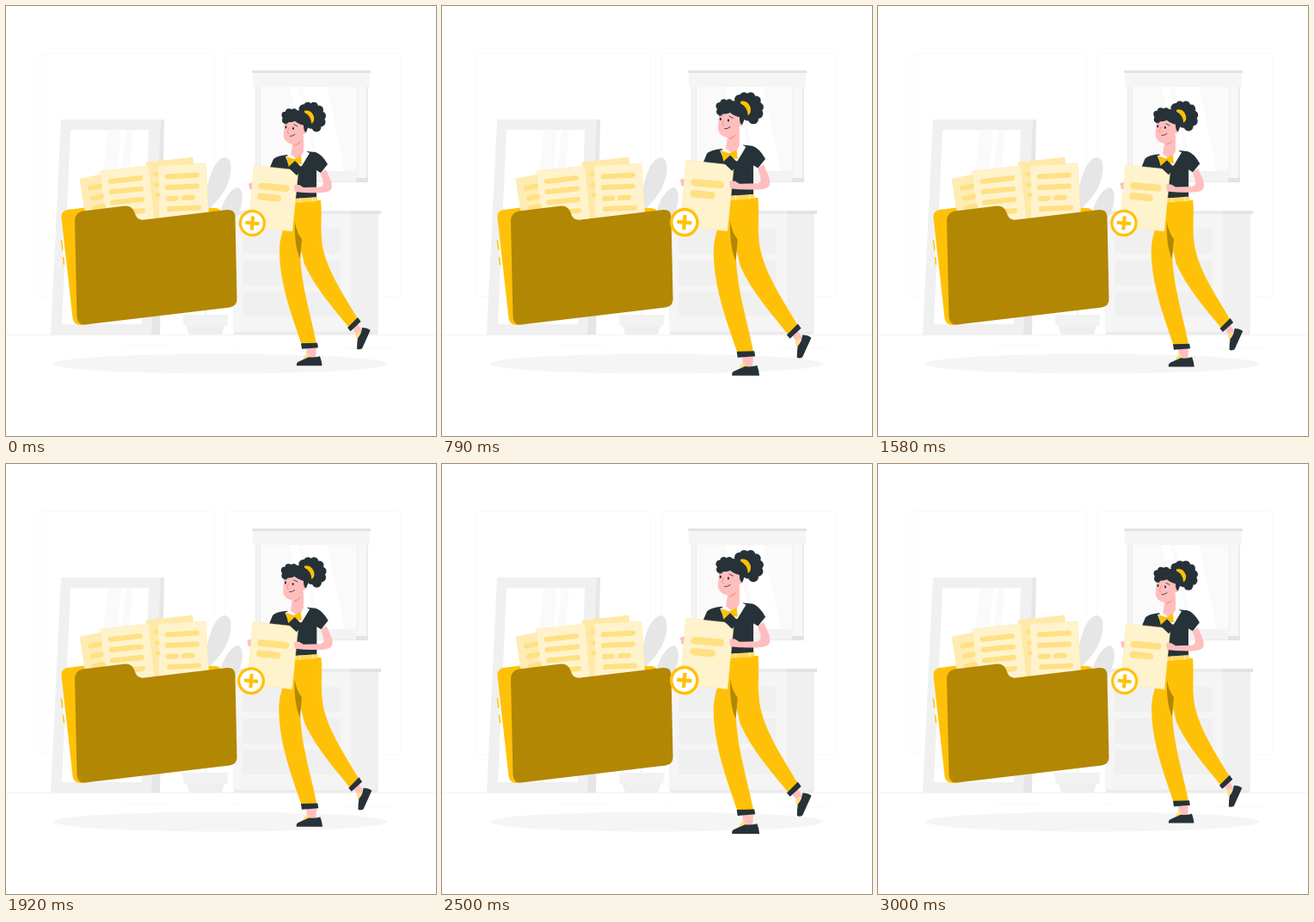
An HTML page that plays this animation: 500 by 500 pixels, repeating every 3040 ms.

```html
<!DOCTYPE html>
<html lang="en">
<head>
<meta charset="utf-8">
<title>Adding a file to a folder</title>
<style>
html, body { margin: 0; width: 100%; height: 100%; overflow: hidden; background: #fff; }
svg { display: block; width: 100vw; height: 100vh; }
.round { fill: none; stroke-linecap: round; stroke-linejoin: round; }
</style>
</head>
<body>
<svg viewBox="0 0 500 500">
  <!-- room -->
  <g fill="none" stroke="#f9f9f9">
    <rect x="39.5" y="55.5" width="203" height="282" rx="2"/>
    <rect x="255.5" y="55.5" width="203" height="282" rx="2"/>
    <path stroke="#f3f3f3" d="M0 382.500H500"/>
    <path d="M135 395.500H192M263 395.500H271M392 398.500H448"/>
  </g>

  <!-- mirror -->
  <path fill="#e6e6e6" d="M170 132H184L179 382H160Z"/>
  <path fill="#f0f0f0" d="M64 132H180L169 382H52Z"/>
  <path fill="#fff" d="M75 144H166L158 370H65Z"/>
  <path fill="#fafafa" d="M118 144H134L124 250H108ZM139 144H148L138 250H129Z"/>

  <!-- window -->
  <path fill="#ebebeb" d="M290 80H421V205H290Z"/>
  <path fill="#f3f3f3" d="M291 80H408V204H291Z"/>
  <path fill="#e3e3e3" d="M407 200H421V205H407Z"/>
  <path fill="#f7f7f7" d="M408 80H419V200H408Z"/>
  <path fill="#fafafa" d="M296 80H410V192H296Z"/>
  <path fill="#fff" d="M330 94H340L362 192H352ZM345 94H373L394 192H366Z"/>
  <path fill="none" stroke="#ebebeb" d="M295.500 94V192M408.500 94V192"/>
  <path fill="#f5f5f5" d="M287 78H423V94H287Z"/>
  <path fill="#e3e3e3" d="M286 75H424V78H286Z"/>

  <!-- cabinet -->
  <path fill="#f5f5f5" d="M264 242H402V380H264Z"/>
  <path fill="#f0f0f0" d="M401 242H433V380H401ZM275 259H389V288H275ZM275 296H389V325H275ZM275 332H389V361H275Z"/>
  <path fill="#ebebeb" d="M262 238H401V242H262ZM265 379H432V382H265Z"/>
  <path fill="#e3e3e3" d="M401 238H436V242H401Z"/>

  <!-- plant -->
  <g fill="#e6e6e6">
    <path d="M231 244C231 211 240 177 255 176C267 178 263 212 240 232L233 246Z"/>
    <path d="M243 270C246 238 258 212 270 211C279 216 275 240 262 253L250 275Z"/>
  </g>
  <path fill="none" stroke="#e6e6e6" d="M232 340V362"/>
  <path fill="#f2f2f2" d="M205 359H259L257 372H207Z"/>
  <path fill="#efefef" d="M210 372H254L251 382H213Z"/>

  <ellipse cx="249.500" cy="416" rx="194" ry="11.500" fill="#f5f5f5"/>

  <!-- folder -->
  <path fill="#ffc107" d="M64.500 246Q64 238.500 71 237L95 234L243 235Q250 235 250 241L262 340L88 371Q79 371.500 77.500 363Z"/>
  <path fill="none" stroke="#fff" stroke-width="1.500" d="M66 271L68.500 301"/>
  <path fill="none" stroke="#ffc107" stroke-width="1.500" stroke-dasharray="12 8" d="M64.500 272L67.500 301"/>
  <g stroke="#ffe69c" stroke-width=".5">
    <path fill="#ffecb4" d="M86 201L140 190L150 250L95 260Z"/>
    <path fill="#ffe9a8" d="M163 182L217 176L222 240L170 250Z"/>
    <path fill="#fff3cd" d="M110 192L166 186L173 252L115 260Z"/>
    <path fill="#fff3cd" d="M177 185.500L232 183L236 245L178 252Z"/>
  </g>
  <g class="round" stroke="#ffe083" stroke-width="6">
    <path d="M98 211.500L109 209.500M101 223.500L111 221.500M103 235L113 233"/>
    <path d="M121.500 204L156 200M122.500 216L157 212.500M124 228.500L158 225M126 241L159 238"/>
    <path stroke-width="5" d="M174 195H175M175 208H176M176 220H177"/>
    <path d="M187.500 198.500L222 196.500M188 211L222 209.500M189 224L198 223.500M207 223L217 222.500M190 236L224 234.500"/>
  </g>
  <path fill="#b28704" d="M80 250Q80 240.500 89 238.500L138 232.500Q146 231.500 149 239L151 244Q154 249.500 161 248.500L257 237Q266 236 266.500 245L268.500 340Q269 349 260 350.500L92 370.500Q83 371.500 82.500 361Z"/>

  <g id="woman">
    <!-- legs -->
    <path fill="#ffbebe" d="M400 371L407 366L414 378L408 382ZM349 396H361L360 410H350Z"/>
    <path fill="#ffe083" d="M406 382L411 377L412 383L409 389ZM347 407L351 403L353 408L345 411Z"/>
    <path fill="#263238" d="M414 374Q420 374 423.500 377L414 398Q411 400 408 398.500Q408 391 409 386Q413 382 414 374Z"/>
    <path fill="#263238" d="M338 418Q337 414 342 412.500L352 408Q358 409 365 407Q367 412 367.500 418Z"/>
    <path fill="#ffc107" d="M336 226L366 226C368 245 364.500 258 368.500 282C375 311 394 338 409 364L399 374C381 352 359 327 347 300L337 260Z"/>
    <path fill="#ffc107" d="M335 228H349L342 287C343 325 354 357 361 392L344 394C331 356 318 322 318 282C319 260 330 243 335 228Z"/>
    <path fill="#b28704" d="M336 251Q338 264 344 271L342 294Q335 279 336 251Z"/>
    <path fill="#263238" d="M409 362L412.500 367L400.500 378L397 374ZM343 392L362 391.500L363 397L344 398.500Z"/>

    <!-- trunk -->
    <path fill="#ffbebe" d="M334 156L346 151L346 174L340 186L331 174Z"/>
    <path fill="#263238" d="M327 173Q315 174 311 178L306 190L330 197L335 224L361 223L361 191L366 194L374 184Q367 172 360 170L350 169L339 184Z"/>
    <path fill="#fff" d="M331 173L325 175L331 190L344 186L353 171L347 168L341 178Z"/>
    <path fill="#ffbebe" d="M335 160L344 160L343 172L336 177L333 173Z"/>
    <path fill="#ffd95f" d="M336 224L362 222V227L335 229Z"/>
    <path class="round" stroke="#fff3cd" d="M342 224V228M357 223V227"/>

    <!-- paper -->
    <path fill="#ffbebe" d="M290 205L283 206Q281 208 283 210L283 213L291 214Z"/>
    <path fill="#fff3cd" stroke="#ffe69c" stroke-width=".5" d="M288.500 185.500L340 191L333 262L282 256Z"/>
    <path class="round" stroke="#ffe083" stroke-width="8" d="M297.500 209.500L325.500 212M296.500 221.500L316 223.500"/>
    <path fill="#ffbebe" d="M365.500 194L372 190C377 201 380 207 378.500 212C376 219 359 217 346 217L336 216L335 208L341 208L346 211L365 210.500C372 209 368 202 365.500 194Z"/>

    <!-- bow tie -->
    <path fill="#ffc107" d="M326 175L335 178L343 174L344 184L336 183L329 188Z"/>
    <path fill="#263238" d="M336 180L345 189L338 197L328 187.500Z"/>

    <!-- head -->
    <path fill="#ffbebe" d="M324 135Q336 130 346 137Q351 137 350 144Q350 149 346 149Q343 161 333 161Q321 158 323 147Z"/>
    <path fill="#ff9a8d" d="M335 161Q341 160 344 155Q342 161 336 163Z"/>
    <g fill="#263238" id="curls"></g>
    <path fill="#263238" d="M323 127Q327 121 333 122Q346 119 353 129Q357 137 351 142L349 147Q346 147 346 139Q339 137 336 134Q329 137 324 134Z"/>
    <path fill="#ffc107" d="M347 122Q355 120 358 129Q359 135 355 137Q355 128 347 124Z"/>
    <g fill="#263238">
      <ellipse cx="325.500" cy="141" rx="1" ry="1.600"/>
      <ellipse cx="334" cy="142.500" rx="1" ry="1.600"/>
    </g>
    <path class="round" stroke="#263238" stroke-width=".8" d="M330 151.500Q333 152 336 149.500M324 137L327 137M335 138L339 140"/>
    <path class="round" stroke="#ff8a7a" stroke-width=".9" d="M329 142L327 147L329 148"/>

    <!-- plus badge -->
    <g transform="translate(286.500 252.500) rotate(5)" stroke="#ffc107">
      <circle r="14" fill="#fff" stroke-width="3.200"/>
      <path d="M-8 0H8M0-8V8" stroke-width="4"/>
    </g>
  </g>
</svg>
<script>
const woman = document.getElementById('woman');

// bun of curls, then the fringe: x, y, radius
const curls = [
  [357, 129, 13], [346, 120, 5.5], [351, 117, 5], [358, 117, 5], [364, 121, 5], [367, 128, 5],
  [366, 135, 5.5], [361, 141, 5.5], [355, 138, 5],
  [324.5, 127, 4], [329, 123.5, 4], [335, 123, 3.5], [325, 133, 4]
];
document.getElementById('curls').innerHTML =
  curls.map(([x, y, r]) => `<circle cx="${x}" cy="${y}" r="${r}"/>`).join('');

const LOOP = 3040;
// linear heartbeat between its turning points: time, scale
const beats = [[-30, 1], [575, 1.1], [1735, 1], [2395, 1.1], [3010, 1], [3615, 1.1]];

function scaleAt(t) {
  const i = beats.findIndex(([end]) => end > t);
  const [t0, s0] = beats[i - 1], [t1, s1] = beats[i];
  return s0 + (s1 - s0) * (t - t0) / (t1 - t0);
}

function draw() {
  const s = scaleAt(performance.now() % LOOP) / 1.004;
  woman.setAttribute('transform', `translate(347 265) scale(${s}) translate(-347 -265)`);
  requestAnimationFrame(draw);
}
draw();
</script>
</body>
</html>
```
